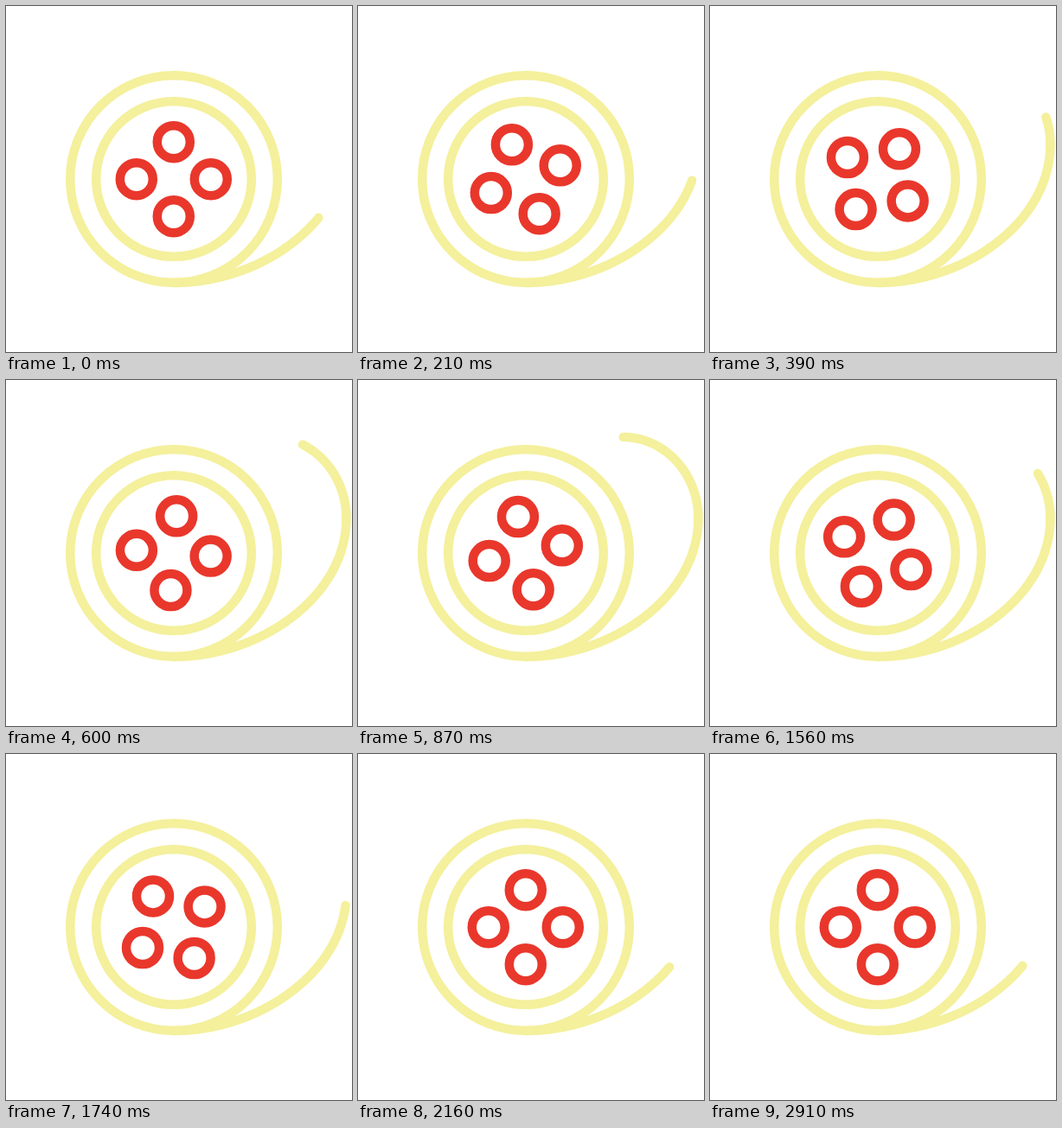
Write an HTML page with a canvas that moves like this. It is 400 by 400 pixels and loops after 3.63 s.

```html
<!DOCTYPE html>
<html lang="en">
<head>
<meta charset="utf-8">
<title>Film reel</title>
<style>
  html, body { margin: 0; width: 100%; height: 100%; overflow: hidden; background: #fff; }
  canvas { display: block; width: 400px; height: 400px; }
</style>
</head>
<body>
<canvas id="stage" width="400" height="400"></canvas>
<script>
const ctx = document.getElementById('stage').getContext('2d');
const LOOP = 3630;
const YELLOW = '#f4f09c', RED = '#e9372c';
const CX = 194, CY = 200;
const TURN = 102 * Math.PI / 180;
const REST = 0.65; // position on the first curve where the tail rests

const clamp = x => Math.max(0, Math.min(1, x));
const smooth = x => x * x * (3 - 2 * x);

function bezier(a, b, c, d, t) {
  const s = 1 - t;
  return s * s * s * a + 3 * s * s * t * b + 3 * s * t * t * c + t * t * t * d;
}

// Film path: a rising curve, then a quarter ellipse, sampled with running length
const points = [];
let total = 0, restLength = 0;

function addPoint(x, y) {
  const last = points[points.length - 1];
  if (last) total += Math.hypot(x - last.x, y - last.y);
  points.push({ x, y, at: total });
}

const STEPS = 160;
for (let i = 0; i <= STEPS; i++) {
  const t = i / STEPS;
  addPoint(bezier(CX, 294.8, 393.4, 393.4, t), bezier(320, 320, 249.6, 160, t));
  if (t <= REST) restLength = total;
}
for (let i = 1; i <= STEPS; i++) {
  const u = i / STEPS * Math.PI / 2;
  addPoint(306.4 + 87 * Math.cos(u), 160 - 94 * Math.sin(u));
}

function unwound(t) {
  if (t < 1190) {
    const x = clamp(t / 900);
    return smooth(x + 0.35 * x * (1 - x));
  }
  return 1 - smooth(clamp((t - 1190) / 895));
}

// The tail dips slightly past its rest before settling
const dip = t => 2 * Math.sin(Math.PI * clamp((t - 2040) / 240)) ** 2;

function ring(x, y, r, color) {
  ctx.strokeStyle = color;
  ctx.beginPath();
  ctx.arc(x, y, r, 0, Math.PI * 2);
  ctx.stroke();
}

function tail(length) {
  ctx.strokeStyle = YELLOW;
  ctx.beginPath();
  ctx.moveTo(points[0].x, points[0].y);
  for (let i = 1; i < points.length; i++) {
    const a = points[i - 1], b = points[i];
    const k = Math.min(1, (length - a.at) / (b.at - a.at));
    ctx.lineTo(a.x + (b.x - a.x) * k, a.y + (b.y - a.y) * k);
    if (k < 1) break;
  }
  ctx.stroke();
}

function draw(t) {
  const out = unwound(t);
  ctx.fillStyle = '#fff';
  ctx.fillRect(0, 0, 400, 400);
  ctx.lineWidth = 10.5;
  ctx.lineCap = ctx.lineJoin = 'round';
  ring(CX, CY, 119.8, YELLOW);
  ring(CX, CY, 89.8, YELLOW);
  tail(restLength + (total - restLength) * out - dip(t));
  for (let i = 0; i < 4; i++) {
    const a = i * Math.PI / 2 - TURN * out;
    ring(CX - 0.2 + 43 * Math.cos(a), CY + 0.2 + 43 * Math.sin(a), 19, RED);
  }
}

const start = performance.now();
function tick() {
  draw((performance.now() - start) % LOOP);
  requestAnimationFrame(tick);
}
tick();
</script>
</body>
</html>
```
